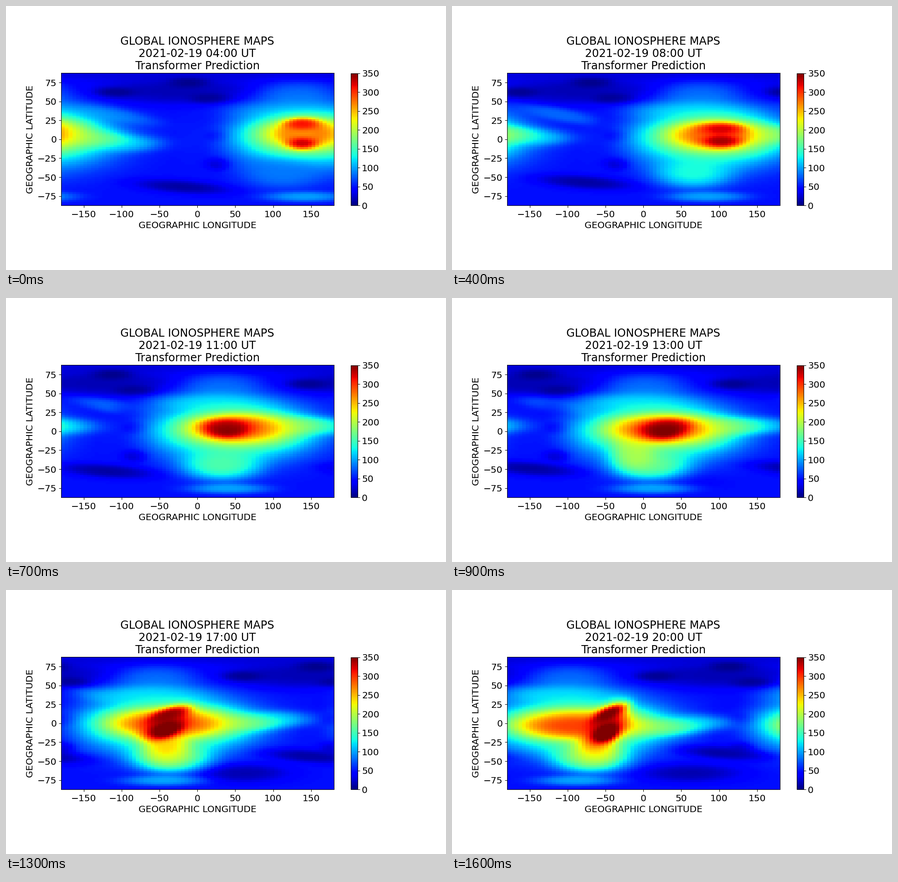
These frames come from a looping animation (966x580 px, 1.7 s). A matplotlib script:

```python
import numpy as np
import matplotlib.pyplot as plt
from matplotlib.animation import FuncAnimation

SCALE = 0.966
plt.rcParams.update({
    "font.family": "DejaVu Sans",
    "font.size": 15 * SCALE,
    "axes.linewidth": 0.8 * SCALE,
    "axes.labelpad": 4 * SCALE,
    **{f"{a}tick.major.size": 3.5 * SCALE for a in "xy"},
    **{f"{a}tick.major.pad": 3.5 * SCALE for a in "xy"},
    **{f"{a}tick.major.width": 0.8 * SCALE for a in "xy"},
})

FIRST_HOUR, FRAMES, INTERVAL = 4, 17, 100
LON, LAT = np.meshgrid(np.linspace(-180, 180, 73), np.linspace(87.5, -87.5, 71))


def ramp(x, start, end):
    return float(np.clip((x - start) / (end - start), 0, 1))


def magnetic_equator(lon):
    return -2 + 9 * np.cos(np.radians(lon - 140))


def spot(field, x, y, rx, ry, value, tilt=0, strength=1):
    """Pull the field towards a value inside a soft tilted ellipse."""
    dx = (LON - x + 180) % 360 - 180
    dy = LAT - y
    c, s = np.cos(np.radians(tilt)), np.sin(np.radians(tilt))
    r2 = ((dx * c + dy * s) / rx) ** 2 + ((dy * c - dx * s) / ry) ** 2
    field += (value - field) * strength * 0.5 ** (r2 ** 1.4)


def paint_night(field, k, sun):
    night = sun + 180
    spot(field, 0, 87, 999, 9, 30)
    # Dark northern cap opposite the sun, with three deeper pockets
    spot(field, night, 64, 105, 16, 17)
    for offset, lat in ((-78, 62), (20, 75), (50, 54)):
        spot(field, night + offset, lat, 24, 6, 5)
    spot(field, sun - 15, 58, 48, 16, 78)
    spot(field, -110, 32, 50, 8, 78, -10)
    # Pre-dawn trough
    dawn = 28 - 16 * k
    spot(field, dawn, 0, 28, 34, 34)
    for lat in (4, -33):
        spot(field, dawn, lat, 14, 7, 14)


def paint_day(field, k, sun):
    grown = ramp(k, 0, 5)
    south = 113 - 11.5 * k
    spot(field, sun, -2, 100 + 0.5 * k, 42, 92)
    spot(field, sun - 25, 37, 68, 12, 90 + 25 * grown)
    # Southern trough and polar hole
    spot(field, -20 - 14.5 * k, -64 + 1.5 * k, 56, 8, 12, -4)
    spot(field, 62, -67, 20 + 2.5 * k, 11, 16, strength=ramp(k, 8, 13))
    spot(field, sun - 5, -77, 48, 6, 98)
    spot(field, sun, 3 - 0.5 * k, 90 + 0.8 * k, 33, 132)
    spot(field, south, -45, 46, 18, 85 + 60 * grown + 35 * ramp(k, 5, 13))
    # Evening tail along the magnetic equator
    tail = sun + 70 + 2.5 * k
    for offset, rx, value in ((38, 48, 112), (0, 42, 160)):
        lon = tail + offset
        spot(field, lon, magnetic_equator(lon), rx, 10, value)


def paint_core(field, k, sun):
    hump = np.sin(np.pi * k / 16)
    lon = sun + 10 * hump
    lat = 7 - 0.5 * k
    width = 52 + 1.3 * k
    late = ramp(k, 8, 16)
    spot(field, lon, lat - 3, width + 14, 24, 188)
    spot(field, lon, lat, width, 17, 242)
    spot(field, 49 - 7 * k, -28, 26, 20, 238, strength=ramp(k, 7, 11))
    spot(field, lon - 4, lat - 3 * late, 32 + 1.7 * k, 13, 278 + k)

    # Two crests that merge around noon and part again
    x = np.interp(k, (0, 4, 7, 9, 11, 13, 16), (140, 104, 40, 28, -5, -42, -50))
    gap = 8 + 5 * np.cos(2 * np.pi * k / 16)
    tilt = 42 * late
    rx = 21 + 6 * hump
    spot(field, x, lat, rx + 8 * late, 10 + 6 * late, 265 + 60 * ramp(k, 2, 12), tilt)
    spot(field, x + 3 * late, lat + gap, rx, 7, 312 + 2.5 * k, 0.6 * tilt)
    spot(field, x, lat - gap, rx - 3, 7 + 0.2 * k, 325 + 3 * k, 0.6 * tilt)


def tec(hour):
    k = hour - FIRST_HOUR
    sun = 148 - 14.56 * k
    field = np.full(LON.shape, 48.0)
    for paint in (paint_night, paint_day, paint_core):
        paint(field, k, sun)
    return field


fig, ax = plt.subplots(figsize=(9.66, 5.8), dpi=100)
image = ax.imshow(tec(FIRST_HOUR), cmap="jet", vmin=0, vmax=350,
                  extent=(-180, 180, -87.5, 87.5))
ax.set_xticks(range(-150, 151, 50))
ax.set_yticks(range(-75, 76, 25))
ax.tick_params(axis="x", pad=3.9)
ax.set_xlabel("GEOGRAPHIC LONGITUDE")
ax.set_ylabel("GEOGRAPHIC LATITUDE")
fig.colorbar(image, ax=ax, shrink=0.65, ticks=range(0, 351, 50))


def heading(text, baseline):
    return fig.text(420.2 / 966, 1 - baseline / 580, text, ha="center",
                    va="baseline", fontsize=18 * SCALE)


heading("GLOBAL IONOSPHERE MAPS", 85.3)
clock = heading("", 112.3)
heading("Transformer Prediction", 139.3)


def update(i):
    hour = FIRST_HOUR + i
    image.set_data(tec(hour))
    clock.set_text(f"2021-02-19 {hour:02d}:00 UT")
    return image, clock


anim = FuncAnimation(fig, update, frames=FRAMES, interval=INTERVAL,
                     repeat=True, repeat_delay=0)
plt.show()
```
